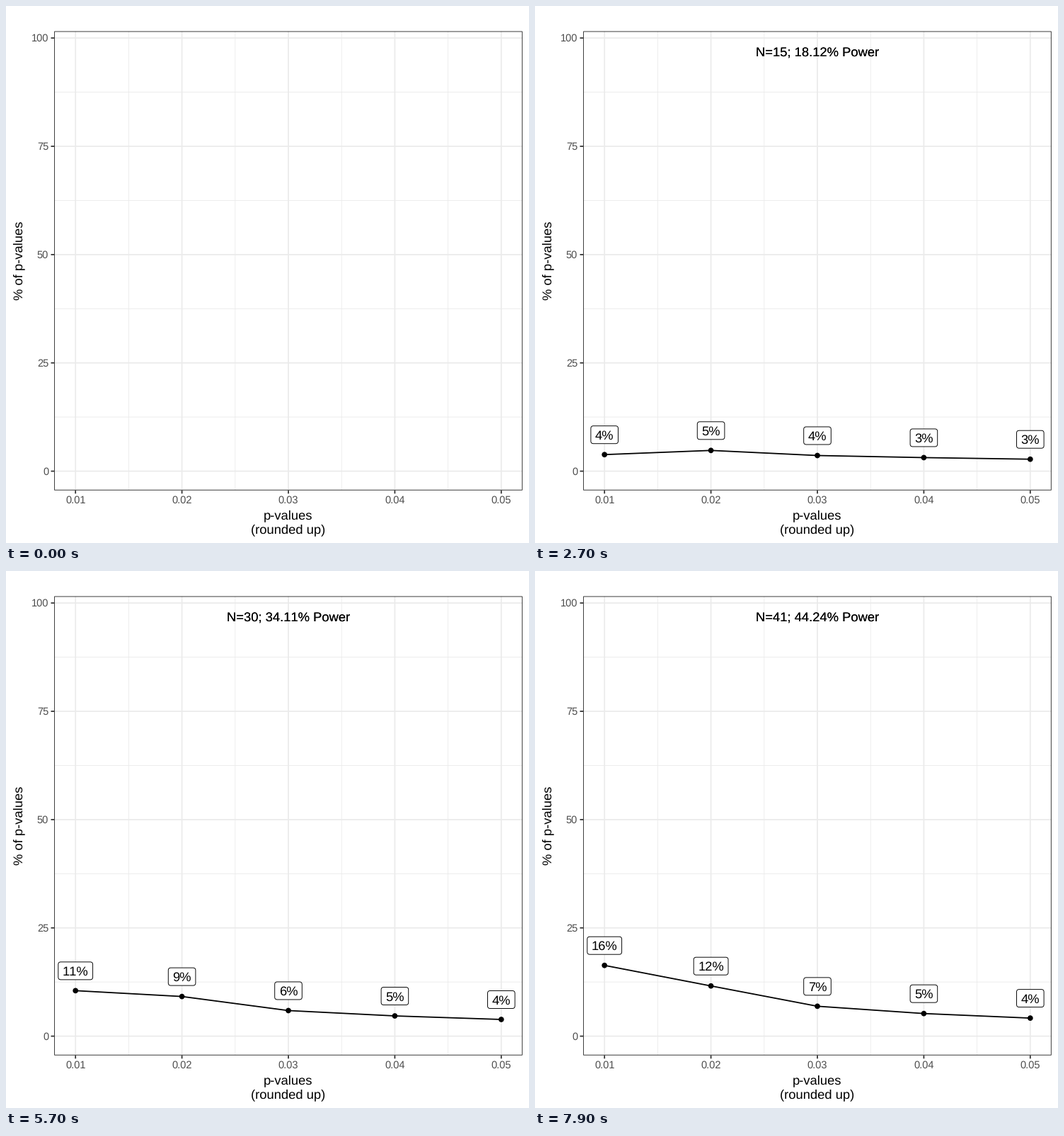
A matplotlib script that plays this animation: 739x758 px, repeating every 8000 ms.

```python
import math

import numpy as np
import matplotlib.pyplot as plt
from matplotlib.animation import FuncAnimation
from matplotlib.patches import Circle, FancyBboxPatch, Rectangle

plt.rcParams.update({
    "font.family": "Liberation Sans",
    "text.hinting": "none",
    "text.kerning_factor": 6,
    "path.snap": False,
})

W, H, DPI = 739, 758, 64
PT = 72 / DPI                      # points per pixel
LEFT, RIGHT, TOP, BOTTOM = 68.1, 729.8, 35.6, 683.7
FRAMES, INTERVAL = 80, 100
BINS = range(5)

# Test power (%) at a few sample sizes
POWER = {2: 5.0, 6: 8.77, 15: 18.12, 20: 22.72, 30: 34.11, 37: 39.97, 41: 44.24}
# Critical z at the upper edge of each p-value bin
CRITICAL = np.array([2.783, 2.416, 2.234, 2.105, 2.005])
EFFECTS = np.linspace(0, 3, 601)

normal_cdf = np.vectorize(lambda z: 0.5 * math.erfc(-z / math.sqrt(2)))


def cumulative(effect, n, z):
    """Percentage of two-sided tests that pass the critical value z."""
    shift = effect / np.sqrt(1 + 1.5 * z**2 / (2 * n - 2))
    return 100 * (normal_cdf(shift - z) + normal_cdf(-shift - z))


def bin_shares(n):
    """Power at sample size n, and how it splits over the bins."""
    power = np.interp(n, list(POWER), list(POWER.values()))
    effect = np.interp(power, cumulative(EFFECTS, n, CRITICAL[-1]), EFFECTS)
    return power, np.diff(cumulative(effect, n, CRITICAL), prepend=0)


def x_pos(i):
    return 98.2 + 150.4 * i


def y_pos(percent):
    return 656.6 - 6.114 * percent


fig = plt.figure(figsize=(W / DPI, H / DPI), dpi=DPI, facecolor="white")
ax = fig.add_axes([0, 0, 1, 1])
ax.set_xlim(0, W)
ax.set_ylim(H, 0)
ax.axis("off")


def line(xs, ys, color, width, z=1):
    return ax.plot(xs, ys, color=color, lw=width * PT, zorder=z,
                   solid_capstyle="butt", solid_joinstyle="round")[0]


def text(x, y, s, size=18.4, color="black", ha="center", **kw):
    return ax.text(x, y, s, fontsize=size * PT, color=color, ha=ha,
                   va="baseline", zorder=6, **kw)


def draw_axes():
    grid, dark, grey = "#EBEBEB", "#333333", "#4D4D4D"
    for i in range(4):
        x, y = x_pos(i + 0.5), y_pos(25 * (i + 0.5))
        line([x, x], [TOP, BOTTOM], grid, 0.89)
        line([LEFT, RIGHT], [y, y], grid, 0.89)
    for i in BINS:
        x, y = x_pos(i), y_pos(25 * i)
        line([x, x], [TOP, BOTTOM], grid, 1.78, 2)
        line([LEFT, RIGHT], [y, y], grid, 1.78, 2)
        line([x, x], [BOTTOM, BOTTOM + 4.6], dark, 1.78, 2)
        line([LEFT - 4.6, LEFT], [y, y], dark, 1.78, 2)
        text(x, 702, f"{(i + 1) / 100:.2f}", 14.67, grey)
        text(60.1, y + 5, str(25 * i), 14.67, grey, ha="right")
    ax.add_patch(Rectangle((LEFT + 0.45, TOP + 0.45), RIGHT - LEFT - 0.9,
                           BOTTOM - TOP - 0.9, fill=False, ec=dark,
                           lw=0.95 * PT, zorder=7))
    text(399, 724, "p-values", 18.33)
    text(399, 744, "(rounded up)", 18.33)
    text(23, 359.5, "% of p-values", 18.33, rotation=90,
         rotation_mode="anchor")


draw_axes()

curve = line([], [], "black", 1.78, 3)
# Two stacked copies darken the caption's edges
captions = [text(399, 71, "") for _ in range(2)]
dots = [ax.add_patch(Circle((0, 0), 3.85, fc="black", ec="none", zorder=4))
        for _ in BINS]
boxes = [ax.add_patch(FancyBboxPatch(
    (0, 0), 1, 1, boxstyle="round,pad=0,rounding_size=3.6",
    fc="white", ec="black", lw=0.95 * PT, zorder=5)) for _ in BINS]
labels = [text(x_pos(i), 0, "") for i in BINS]
moving = [curve, *captions, *dots, *boxes, *labels]


def update(k):
    for artist in moving:
        artist.set_visible(k > 0)
    if k == 0:
        return moving
    n = 2 + (k - 1) // 2
    power, shares = bin_shares(n)
    xs, ys = x_pos(np.arange(5)), y_pos(shares)
    curve.set_data(xs, ys)
    for caption in captions:
        caption.set_text(f"N={n}; {power:.2f}% Power")
    for x, y, share, dot, box, label in zip(xs, ys, shares, dots, boxes, labels):
        s = f"{share:.0f}%"
        width = 18.2 + 10.2 * len(s)
        mid = y - 28
        dot.center = (x, y)
        box.set_bounds(x - width / 2, mid - 12.5, width, 25)
        label.set_text(s)
        label.set_y(mid + 6.5)
    return moving


anim = FuncAnimation(fig, update, frames=FRAMES, interval=INTERVAL,
                     init_func=lambda: update(0), repeat=True,
                     repeat_delay=0, blit=False)
plt.show()
```
